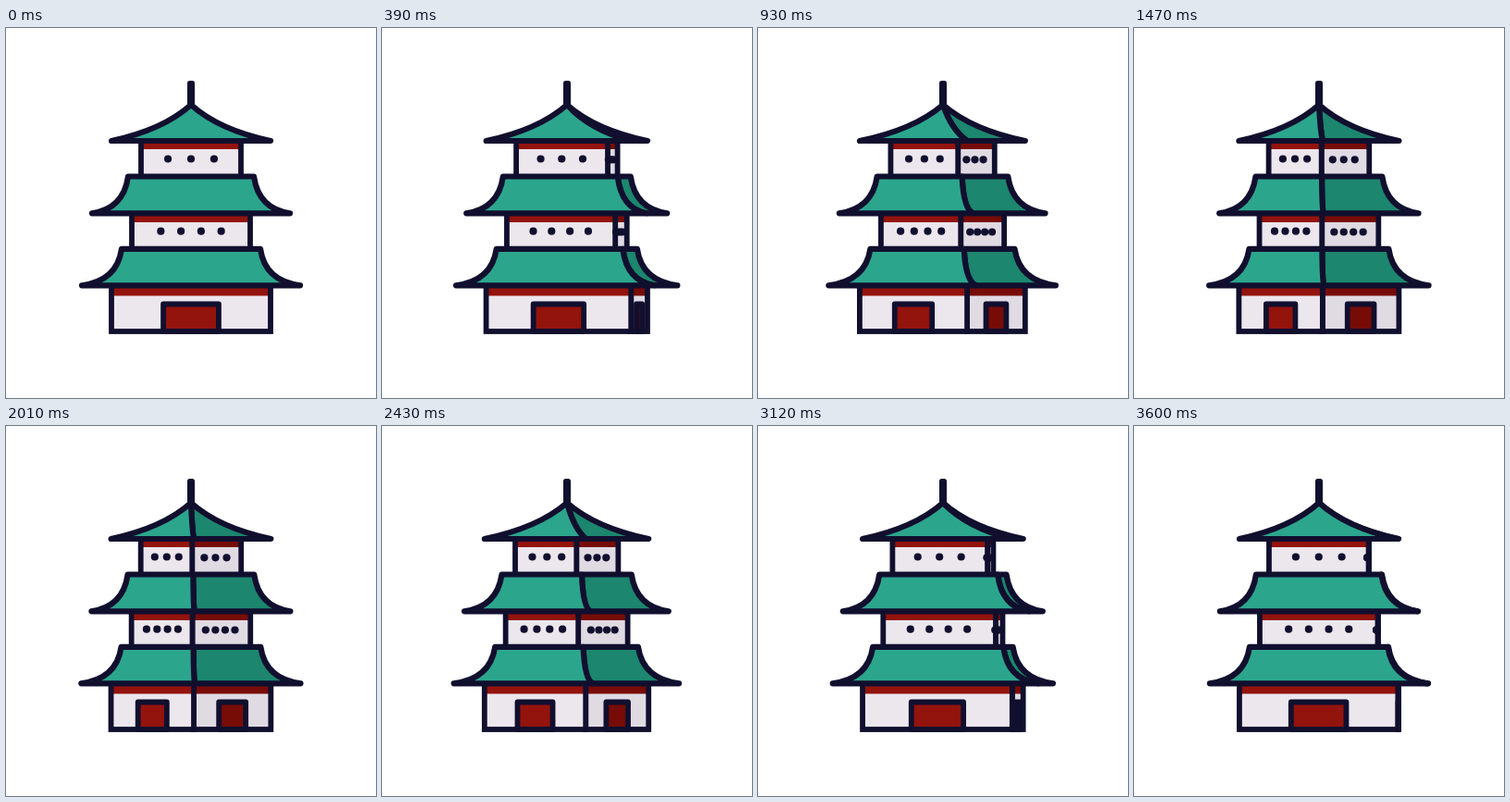
Recreate the animation shown at these times as an HTML page with a canvas. Size 400 by 400 pixels, loop 5630 ms.

```html
<!DOCTYPE html>
<html lang="en">
<head>
<meta charset="utf-8">
<title>Turning pagoda</title>
<style>
  html, body { margin: 0; width: 100%; height: 100%; overflow: hidden; background: #fff; }
  canvas { display: block; width: 400px; height: 400px; }
</style>
</head>
<body>
<canvas id="stage" width="400" height="400"></canvas>
<script>
const ctx = document.getElementById('stage').getContext('2d');
const LOOP = 5630, END = 3600, STEP = 30, CX = 200;
const INK = '#110f2e', WALL_LINE = 5.8, ROOF_LINE = 6.2;
const LIT = { roof: '#2ca58d', wall: '#ece6ed', red: '#93130d', dx: 0, dy: 0 };
const SHADE = { roof: '#1c866e', wall: '#e0dae3', red: '#770c07', dx: -1.6, dy: 0.8 };

// Turn over time: 0 is a flat front view, 1 puts the corner in the middle.
const TURN = [
  [0, 0], [390, 0.195], [570, 0.37], [930, 0.697], [1140, 0.815], [1470, 0.955],
  [1740, 1], [2010, 0.965], [2280, 0.855], [2430, 0.765], [2850, 0.37],
  [3120, 0.13], [3420, 0.022], [3600, 0.008]
];
// The corners of the upper walls swing back later and faster.
const UPPER_TURN = [
  [0, 0], [390, 0.185], [930, 0.7], [1470, 0.95], [1740, 1],
  [2430, 0.81], [3120, 0.11], [3600, 0.008]
];
const PEAK = 0.65; // turn at which the outline is widest

const roofs = [
  { top: 160.5, bottom: 200.3, bend: 195.5, half: [68, 73, 107] },
  { top: 238.8, bottom: 278.3, bend: 273.5, half: [75, 80, 118] },
  { top: 83, bottom: 122, bend: 110, half: [0, 30, 86] }
];
const walls = [
  { top: 122, bottom: 161, band: 131, half: 54, track: UPPER_TURN,
    dots: [0.269, 0.5, 0.731], dotY: 141.5 },
  { top: 200, bottom: 239, band: 210, half: 64, track: UPPER_TURN,
    dots: [0.245, 0.415, 0.585, 0.755], dotY: 219.7 },
  { top: 278, bottom: 328, band: 289.5, half: 86, track: TURN,
    door: [0.326, 0.674], doorY: 298.5 }
];

// Flat at both ends and at the full turn, smooth elsewhere.
function slope(track, i) {
  const a = track[i - 1], b = track[i + 1];
  return a && b && track[i][1] < 1 ? (b[1] - a[1]) / (b[0] - a[0]) : 0;
}

function turnAt(track, t) {
  let i = 0;
  while (i < track.length - 2 && t > track[i + 1][0]) i++;
  const [t0, v0] = track[i], [t1, v1] = track[i + 1];
  const d = t1 - t0, u = (t - t0) / d, w = 1 - u;
  return v0 * (1 + 2 * u) * w * w + slope(track, i) * d * u * w * w
       + v1 * u * u * (3 - 2 * u) - slope(track, i + 1) * d * u * u * w;
}

// Left edge, corner and right edge for a given half width.
function edges(half, turn) {
  const swell = turn < PEAK ? turn / PEAK : (1 - turn) / (1 - PEAK);
  return [
    CX - half * (1 + 0.055 * swell),
    CX + half * (1 - turn),
    CX + half * (1 + 0.038 * swell)
  ];
}

function paint(fill) {
  ctx.fillStyle = fill;
  ctx.fill();
  ctx.stroke();
}

function wallFace(w, x0, x1, tone) {
  const width = x1 - x0;
  ctx.fillStyle = tone.wall;
  ctx.fillRect(x0, w.top, width, w.bottom - w.top);
  ctx.fillStyle = tone.red;
  ctx.fillRect(x0, w.top, width, w.band - w.top);
  ctx.lineJoin = 'miter';
  ctx.strokeRect(x0, w.top, width, w.bottom - w.top);
}

function openings(w, x0, x1, tone) {
  const place = f => x0 + f * (x1 - x0);
  if (w.door) {
    const [a, b] = w.door.map(place);
    ctx.lineJoin = 'round';
    ctx.beginPath();
    ctx.rect(a, w.doorY, b - a, w.bottom - w.doorY);
    paint(tone.red);
    return;
  }
  ctx.fillStyle = INK;
  for (const f of w.dots) {
    ctx.beginPath();
    ctx.arc(place(f) + tone.dx, w.dotY + tone.dy, 4.1, 0, Math.PI * 2);
    ctx.fill();
  }
}

function roofFace(r, xs, from, to, fill) {
  const [top, bend, tip] = xs;
  ctx.lineJoin = 'round';
  ctx.beginPath();
  ctx.moveTo(top[from], r.top);
  ctx.lineTo(top[to], r.top);
  ctx.quadraticCurveTo(bend[to], r.bend, tip[to], r.bottom);
  ctx.lineTo(tip[from], r.bottom);
  ctx.quadraticCurveTo(bend[from], r.bend, top[from], r.top);
  ctx.closePath();
  paint(fill);
}

function draw(t) {
  const turn = turnAt(TURN, t);
  const turned = turn > 0;
  ctx.fillStyle = '#fff';
  ctx.fillRect(0, 0, 400, 400);
  ctx.strokeStyle = INK;

  ctx.lineWidth = WALL_LINE;
  for (const w of walls) {
    const [left, middle, right] = edges(w.half, turn);
    const corner = edges(w.half, turnAt(w.track, t))[1];
    if (turned) wallFace(w, corner, right, SHADE);
    wallFace(w, left, corner, LIT);
    if (turned) openings(w, middle, right, SHADE);
    openings(w, left, middle, LIT);
  }

  ctx.lineWidth = ROOF_LINE;
  for (const r of roofs) {
    const xs = r.half.map(h => edges(h, turn));
    if (turned) roofFace(r, xs, 1, 2, SHADE.roof);
    roofFace(r, xs, 0, 1, LIT.roof);
  }

  ctx.fillStyle = INK;
  ctx.beginPath();
  ctx.roundRect(CX - 4, 57, 8, 28, 2.5);
  ctx.fill();
}

const start = performance.now();
function tick() {
  const t = (performance.now() - start) % LOOP;
  draw(Math.min(END, Math.floor(t / STEP) * STEP));
  requestAnimationFrame(tick);
}
tick();
</script>
</body>
</html>
```
